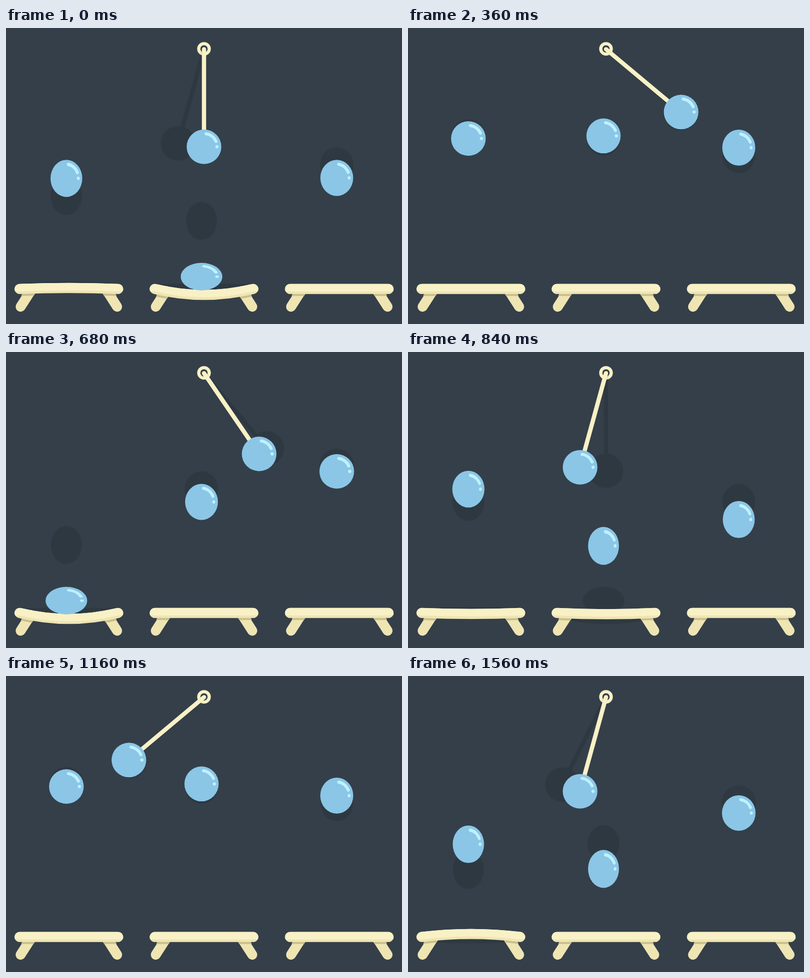
An HTML page for the animation above (1600 ms loop, 800 px wide and 600 px high).

```html
<!DOCTYPE html>
<html lang="en">
<head>
<meta charset="utf-8">
<title>Bouncing balls and pendulum</title>
<style>
html, body { margin: 0; width: 100%; height: 100%; overflow: hidden; background: #343f49; }
svg { display: block; width: 100vw; height: 100vh; }
</style>
</head>
<body>
<svg viewBox="0 0 800 600">
  <defs><g id="shine">
    <path d="M4 -26.3A26.6 26.6 0 0 1 24.3 -10.8" fill="none" stroke="#bff1fe" stroke-width="6" stroke-linecap="round"/>
    <circle cx="26.2" r="3.2" fill="#bff1fe"/>
  </g></defs>
  <circle cx="400" cy="42.3" r="10.6" fill="none" stroke="#f9f1c6" stroke-width="6.4"/>
  <g id="shade" opacity=".1"></g>
  <g id="scene"></g>
</svg>
<script>
const STEP = 40, LOOP = 40, BOUNCE = 20;
const CREAM = '#f9f1c6', TAN = '#efe5b3', BLUE = '#8bc6e7';
const PIVOT = { x: 400, y: 42, len: 198.7 };

// Each station: ball x, bench centre x, step offset of its bounce.
const stations = [
  { x: 122, bench: 127, lag: 3 },
  { x: 395, bench: 400, lag: 0 },
  { x: 668.2, bench: 673.3, lag: 17 }
];

// Ball height per step of a bounce, and bench bend just after impact.
const heights = [504, 393, 341, 304.8, 278, 257.7, 242.5, 231, 223.3, 218.7,
  217.3, 219, 224, 231, 242, 257, 277.7, 303.8, 339.5, 391];
const bends = [12, 2.5, -6, -2, 2, 0.5];

const shade = document.getElementById('shade');
const scene = document.getElementById('scene');
const mod = (a, b) => ((a % b) + b) % b;

// Half-widths of a ball: squashed on impact, stretched when fast.
function ballSize(m) {
  if (m === 0) return [42, 28];
  const p = m <= 10 ? (10 - m) / 9 : Math.pow(Math.max(0, m - 14) / 5, 1.4);
  return [35 - 3.75 * p, 35 + 3.4 * p];
}

function ball(x, y, rx, ry, color) {
  const shine = color === BLUE
    ? `<use href="#shine" transform="translate(${x} ${y}) scale(${rx / 35} ${ry / 35})"/>` : '';
  return `<ellipse cx="${x}" cy="${y}" rx="${rx}" ry="${ry}" fill="${color}"/>${shine}`;
}

function slab(x, bend, color, dy = 0, extra = '') {
  return `<path d="M${x - 99.5} ${529 + dy}q99.5 ${2 * bend} 199 0" fill="none"
    stroke="${color}" stroke-width="20.5" stroke-linecap="round" ${extra}/>`;
}

function bench(x, bend, i) {
  const leg = s => `<path d="M${x + s * 97.5} 565L${x + s * 77} 533" fill="none"
    stroke="${TAN}" stroke-width="20" stroke-linecap="round"/>`;
  const legArea = s => `M${x + s * 99} 548L${x + s * 92} 533H${x + s * 65}L${x + s * 74} 548Z`
    .replace(`M${x + s * 99}`, `M${x + s * 98.5}`);
  return `<clipPath id="legs${i}"><path d="${legArea(-1)}${legArea(1)}"/></clipPath>
    <clipPath id="top${i}"><path d="M${x - 112} 534H${x - 99.5}q99.5 ${2 * bend} 199 0H${x + 112}V500H${x - 112}Z"/></clipPath>
    ${leg(-1)}${leg(1)}
    ${slab(x, bend, '#c9be8b', 4, `clip-path="url(#legs${i})"`)}
    ${slab(x, bend, TAN)}
    ${slab(x, bend, CREAM, 0, `clip-path="url(#top${i})"`)}`;
}

// Swing angle in radians: right for the first half loop, left for the second.
function swing(n) {
  const side = n < BOUNCE ? 1 : -1;
  const u = Math.abs(1 - (n % BOUNCE) / 10);
  return side * 50 * (1 - u * u * (0.45 + 0.55 * Math.pow(u, 2.85))) * Math.PI / 180;
}

function pendulum(n, rope, color) {
  const a = swing(n);
  const x = PIVOT.x + PIVOT.len * Math.sin(a), y = PIVOT.y + PIVOT.len * Math.cos(a);
  return `<path d="M${PIVOT.x} ${PIVOT.y + 1}L${x} ${y}" stroke="${rope}"
    stroke-width="8.6" stroke-linecap="round"/>` + ball(x, y, 35, 35, color);
}

function draw(n, shadow) {
  n = mod(n, LOOP);
  let benches = '', balls = '';
  stations.forEach((s, i) => {
    const m = (n + s.lag) % BOUNCE;
    const bend = bends[m] || 0;
    benches += shadow ? slab(s.bench, bend, '#000') : bench(s.bench, bend, i);
    balls += ball(s.x, heights[m], ...ballSize(m), shadow ? '#000' : BLUE);
  });
  return benches + pendulum(n, shadow ? '#000' : CREAM, shadow ? '#000' : BLUE) + balls;
}

let last = -1;
function render(now) {
  const n = Math.floor(now / STEP) % LOOP;
  if (n !== last) {
    last = n;
    shade.innerHTML = draw(n - 1, true); // the shadow trails one step behind
    scene.innerHTML = draw(n, false);
  }
}

function tick() {
  render(performance.now() - start);
  requestAnimationFrame(tick);
}

const start = performance.now();
render(0);
requestAnimationFrame(tick);
</script>
</body>
</html>
```
